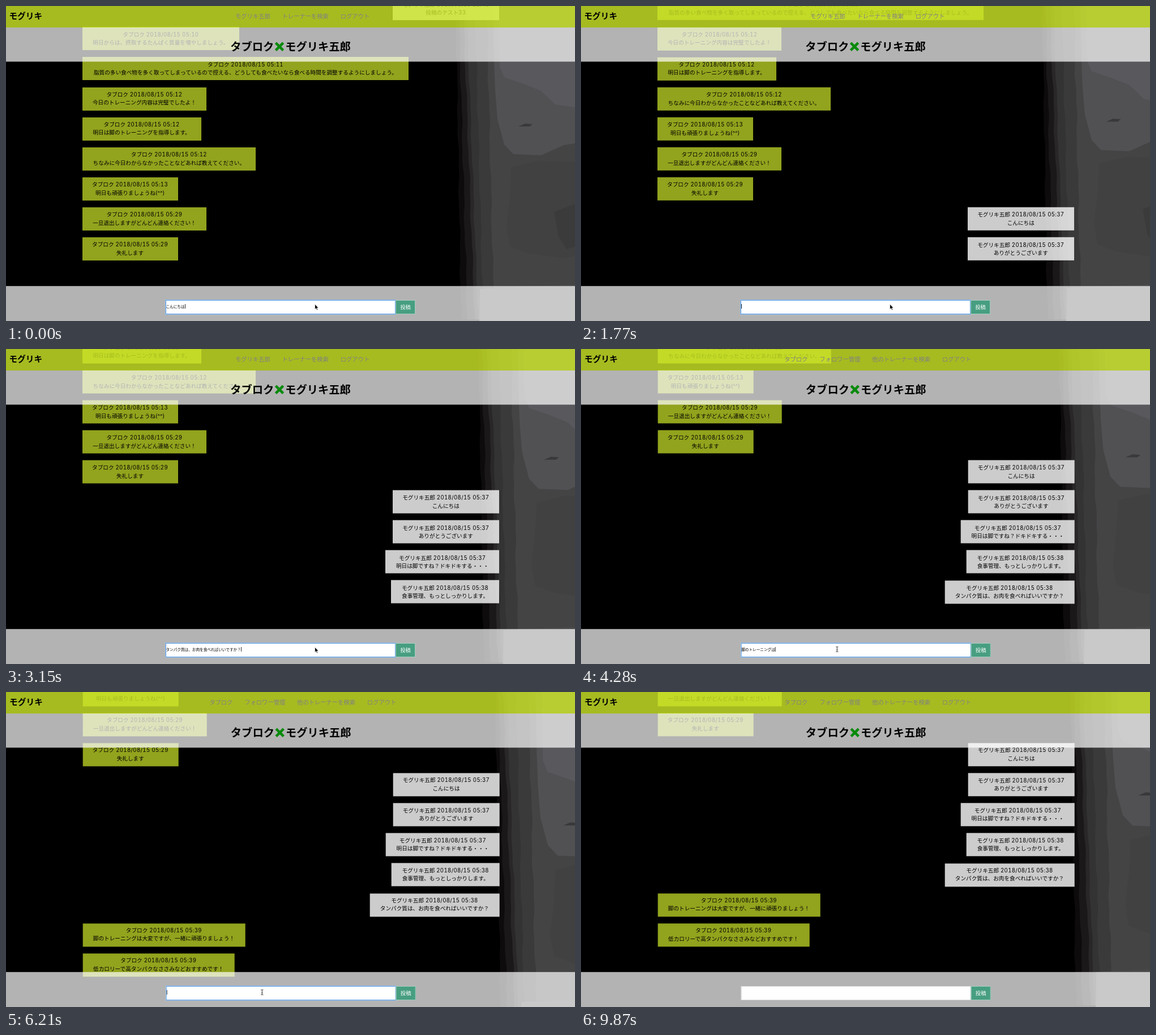
An HTML page that plays this animation: 1005 px wide and 557 px high, repeating every 9970 ms.

```html
<!DOCTYPE html>
<html lang="ja">
<head>
<meta charset="utf-8">
<title>チャット</title>
<style>
html, body { margin: 0; width: 100%; height: 100%; overflow: hidden; background: #000; }
body { position: relative; color: #000; font-family: Inter, "Noto Sans CJK JP", "Noto Sans CJK", sans-serif; }
body * { box-sizing: border-box; }
div, svg { position: absolute; }
.layer { left: 0; top: 0; width: 1005px; height: 557px; }
.msg { height: 41px; padding-top: 6.4px; text-align: center; font-size: 9.65px; line-height: 14.5px;
  white-space: pre; background: rgba(208, 232, 42, .7); }
.msg.mine { background: rgba(255, 255, 255, .8); }
.date { font-variant-numeric: tabular-nums; letter-spacing: .35px; }
#brand { left: 5.4px; top: 8px; font: 700 14.7px/20px Inter, "Noto Sans CJK JP", sans-serif; white-space: nowrap; }
#menu { left: 0; top: 8px; width: 1047.2px; display: flex; justify-content: center; gap: 20.8px;
  font-size: 10.3px; line-height: 21px; color: #808080; white-space: nowrap; }
#title { left: 0; width: 1005px; top: 57px; height: 30px; font-size: 19.27px; line-height: 30px; font-weight: 700;
  white-space: nowrap; display: flex; justify-content: center; }
#title svg { position: static; width: 20px; height: 30px; }
#field { left: 281.5px; top: 519.5px; width: 406.5px; height: 25px; background: #fff; border: 1px solid #d8d8d8;
  font-size: 6.63px; line-height: 23px; white-space: nowrap; padding-left: .4px; }
#field.focus { border: 1.5px solid #5d9fe4; box-shadow: 0 0 0 .7px #93c3f3; line-height: 22px; padding-left: 0; }
#caret { display: inline-block; width: 1px; height: 8px; margin-left: .3px; background: #333; vertical-align: -1.4px; }
#send { left: 687.8px; top: 519.5px; width: 35.5px; height: 25px; background: #479e81; border: .8px solid #a4cdbf;
  color: #fff; font-size: 9.4px; font-weight: 500; line-height: 23px; text-align: center; }
</style>
</head>
<body>
<svg class="layer"><g id="wall"></g></svg>
<div id="list" class="layer"></div>
<svg class="layer">
  <rect width="1005" height="38" fill="#d0ea28" fill-opacity=".8"/>
  <rect y="38" width="1005" height="60.4" fill="#fff" fill-opacity=".7"/>
  <rect y="495.2" width="1005" height="62" fill="#fff" fill-opacity=".7"/>
</svg>
<div id="ui" class="layer">
  <div id="brand"></div>
  <div id="menu"></div>
  <div id="title"></div>
  <div id="field"><span id="typed"></span><span id="caret"></span></div>
  <div id="send">投稿</div>
</div>
<svg class="layer">
  <path id="arrow" d="M0 0V9.2L2.1 7.3L3.5 10.6L5 10L3.6 6.8H6.4Z" fill="#000" stroke="#fff" stroke-width=".7"/>
  <path id="beam" d="M-2 -4.6Q0 -4.6 0 -3.4Q0 -4.6 2 -4.6M0 -3.4V3.4M-2 4.6Q0 4.6 0 3.4Q0 4.6 2 4.6M-1 1H1" fill="none" stroke="#222" stroke-width=".9"/>
</svg>
<script>
const $ = id => document.getElementById(id);
const LOOP = 9970, PITCH = 53.1, EM = 9.65;
const BRAND = 'モグリキ', USER = BRAND + '五郎', COACH = 'タブロク';

// [day and time, text, posted by the user]
const messages = [
  ['10 22:43', '投稿のテスト33', 1],
  ['15 05:10', '明日からは、摂取するたんぱく質量を増やしましょう。'],
  ['15 05:11', '脂質の多い食べ物を多く取ってしまっているので控える、どうしても食べたいなら食べる時間を調整するようにしましょう。'],
  ['15 05:12', '今日のトレーニング内容は完璧でしたよ！'],
  ['15 05:12', '明日は脚のトレーニングを指導します。'],
  ['15 05:12', 'ちなみに今日わからなかったことなどあれば教えてください。'],
  ['15 05:13', '明日も頑張りましょうね(^^)'],
  ['15 05:29', '一旦退出しますがどんどん連絡ください！'],
  ['15 05:29', '失礼します'],
  ['15 05:37', 'こんにちは', 1],
  ['15 05:37', 'ありがとうございます', 1],
  ['15 05:37', '明日は脚ですね？ドキドキする・・・', 1],
  ['15 05:38', '食事管理、もっとしっかりします。', 1],
  ['15 05:38', 'タンパク質は、お肉を食べればいいですか？', 1],
  ['15 05:39', '脚のトレーニングは大変ですが、一緒に頑張りましょう！'],
  ['15 05:39', '低カロリーで高タンパクなささみなどおすすめです！']
];
const OLD = 9;

// [start, new posts, pixels left to scroll, letters typed]
const steps = [
  [0, 0, 0, 99], [620, 1, PITCH, 0], [800, 1, 0, 0], [1040, 1, 0, 99],
  [1420, 2, PITCH, 0], [1600, 2, 0, 0], [1790, 2, 0, 4], [1990, 2, 0, 11], [2190, 2, 0, 99],
  [2390, 3, PITCH, 0], [2570, 3, 0, 99], [2760, 4, PITCH, 0], [2950, 4, 0, 0], [3150, 4, 0, 99],
  [3620, 5, PITCH, 0], [3800, 5, 0, 0], [4000, 5, 0, 0], [4240, 5, 0, 9], [4460, 5, 0, 99],
  [4790, 6, PITCH, 0], [4970, 6, 30, 0], [5140, 6, 7.4, 0], [5380, 6, 0, 99],
  [6040, 7, PITCH, 0], [6220, 7, 30, 0], [6390, 7, 7.4, 0], [6660, 7, 0, 0]
];
const SWITCH = 4000, BLUR = 9870;

// [start, shape, x, y]
const pointer = [
  [0, 'arrow', 545.6, 527.2], [SWITCH, 'beam', 452.3, 531],
  [7610, 'beam', 520, 529], [7760, 'beam', 640, 525],
  [7910, 'arrow', 752, 506], [8060, 'arrow', 828, 493], [8210, '', 0, 0]
];
const at = (rows, t) => rows.findLast(r => r[0] <= t);

const items = messages.map(([time, text, mine], i) => {
  const el = document.createElement('div');
  const name = mine ? USER : COACH;
  const width = Math.max(name.length * EM + 94, text.includes('^') ? 0 : text.length * EM) + 36.5;
  el.className = mine ? 'msg mine' : 'msg';
  el.innerHTML = `${name}<span class="date"> 2018/08/${time}</span>\n${text.replace('33', '<span class="date">33</span>')}`;
  el.style.width = width + 'px';
  el.style.left = (mine ? 871 - width : 134.5) + 'px';
  el.style.top = 409 + PITCH * (i - OLD + 1) + 'px';
  $('list').append(el);
  return el;
});

// Dim photo: ragged vertical bands, then a few flat patches
function band(top, bottom, rough, fill) {
  let d = 'M1010 -90';
  for (let y = -90; y <= 560; y += 7) {
    const k = (y + 90) / 650;
    const x = top + (bottom - top) * k + rough * (Math.sin(y * .047 + top) + .5 * Math.sin(y * .13));
    d += `L${x.toFixed(1)} ${y}`;
  }
  return `<path d="${d}L1010 560Z" fill="${fill}"/>`;
}
const patch = (d, fill) => `<path d="${d}" fill="${fill}"/>`;
$('wall').innerHTML =
  band(793, 804, .9, '#0e0b0c') + band(797, 815, 1, '#1b1819') +
  band(804, 828, .9, '#292728') + band(810, 834, .8, '#343334') +
  band(826, 843, .9, '#3b3a3b') + band(847, 862, 1, '#444445') +
  patch('M858 -90L862 95L864 150L868 200L880 245L896 262L945 264L985 246L1010 242V-90Z', '#515053') +
  patch('M868 -90L872 108L880 126L915 138L945 150L970 174L1010 180V-90Z', '#59585c') +
  patch('M893 285L940 274L1010 276V440L985 446L925 438L890 425L884 390L890 340Z', '#414142') +
  patch('M968 364L1010 348V424L990 430L976 408Z', '#3b3b3c') +
  patch('M905 213L917 208L930 209L925 213Z', '#39383a') +
  patch('M837 500L1010 492V560H836Z', '#4a4a4b');

$('brand').textContent = BRAND;
$('title').innerHTML = `${COACH}<svg viewBox="0 0 20 30"><path d="M3.4 8.2L16.6 21.4M16.6 8.2L3.4 21.4" stroke="#078a0b" stroke-width="4.6"/></svg>${USER}`;
const menus = [
  [USER, 'トレーナーを検索', 'ログアウト'],
  [COACH, 'フォロワー管理', '他のトレーナーを検索', 'ログアウト']
].map(m => m.map(s => `<span>${s}</span>`).join(''));
let view = -1;

function draw(t) {
  const [, n, rest, letters] = at(steps, t);
  const second = t >= SWITCH ? 1 : 0, dx = second * .7;
  if (view !== second) $('menu').innerHTML = menus[view = second];

  items.forEach((el, i) => el.style.display = i < OLD + n ? '' : 'none');
  $('list').style.transform = `translate(${dx}px, ${rest - PITCH * n}px)`;
  $('ui').style.transform = `translateX(${dx}px)`;
  // the photo covers the page, so it grows with every post
  $('wall').setAttribute('transform', `translate(0 ${557 + rest}) scale(${1 + .0125 * n}) translate(0 -557)`);

  const next = messages[OLD + n];
  $('typed').textContent = next ? next[1].slice(0, letters) : '';
  const caret = t < 6660 || (t >= 7310 && t < 8060) || (t >= 8660 && t < 9250);
  $('caret').style.visibility = caret ? 'visible' : 'hidden';
  $('field').className = t < BLUR ? 'focus' : '';

  const [, shape, x, y] = at(pointer, t);
  for (const id of ['arrow', 'beam']) {
    $(id).style.display = id === shape ? '' : 'none';
    $(id).setAttribute('transform', `translate(${x} ${y})`);
  }
}

const start = performance.now();
function tick() {
  draw((performance.now() - start) % LOOP);
  requestAnimationFrame(tick);
}
tick();
</script>
</body>
</html>
```
